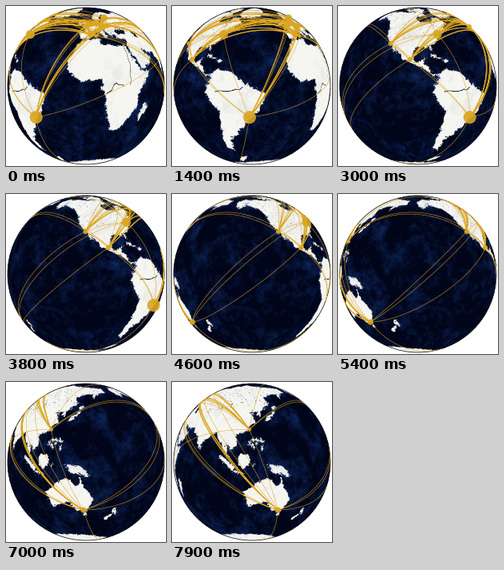
A matplotlib script for the animation above (8 s loop, 200 px wide and 200 px high).

```python
from itertools import combinations

import matplotlib.pyplot as plt
import numpy as np
from matplotlib.animation import FuncAnimation
from matplotlib.path import Path

SIZE, DPI, FRAMES, INTERVAL = 200, 100, 80, 100
CENTER, RADIUS, SUB = 100, 98, 3
START_LON, STEP = -2.7, -3.0
GOLD = "#daa520"

# World map in plate carree, RES cells per degree
RES = 4
H, W = 180 * RES, 360 * RES
rng = np.random.default_rng(4)


def smooth(field, weight):
    fy, fx = np.fft.fftfreq(H)[:, None], np.fft.rfftfreq(W)[None]
    return np.fft.irfft2(np.fft.rfft2(field) * weight(np.hypot(fx, fy)), (H, W))


def fractal(low, power=1.5):
    """Seeded cloud noise of unit deviation; low sets the largest wave."""
    n = smooth(rng.normal(size=(H, W)), lambda f: 1 / (f + low) ** power)
    return (n - n.mean()) / n.std()


true_lon, true_lat = np.meshgrid((np.arange(W) + 0.5) / RES - 180,
                                 90 - (np.arange(H) + 0.5) / RES)
# Bending the coordinates turns plain outlines into ragged coasts
lon = true_lon + 0.7 * fractal(0.02)
lat = true_lat + 0.7 * fractal(0.02)
land = np.zeros((H, W), bool)


def coast(*coords):
    """Fill an outline given as lon, lat, lon, lat, ..."""
    pts = np.reshape(coords, (-1, 2))
    (w, s), (e, n) = pts.min(0), pts.max(0)
    box = (lon >= w) & (lon <= e) & (lat >= s) & (lat <= n)
    land[box] |= Path(pts).contains_points(np.c_[lon[box], lat[box]])


def blob(x, y, length, width, tilt=0, value=True):
    """Ellipse for an island, or for a sea when value is False."""
    t = np.radians(tilt)
    dx, dy = (lon - x) * np.cos(np.radians(y)), lat - y
    u, v = dx * np.cos(t) + dy * np.sin(t), dy * np.cos(t) - dx * np.sin(t)
    land[(u / length) ** 2 + (v / width) ** 2 < 0.25] = value


def scatter_islands(n, west, east, south, north, size):
    for _ in range(n):
        blob(rng.uniform(west, east), rng.uniform(south, north),
             size * rng.uniform(0.6, 1.6), size * 0.6, rng.uniform(0, 180))


# Americas
coast(-77, 8, -72, 12, -62, 10.5, -50, 1, -35, -6, -39, -18, -48.5, -26,
      -53, -34, -58, -35, -57, -38, -65, -41, -66, -48, -69, -51, -66, -55,
      -74, -52, -73, -37, -70, -19, -76, -14, -81, -5, -80, 1)
coast(-77, 8, -83, 10, -83.5, 15, -88, 16, -87, 21.5, -91, 18.5, -95, 18.5,
      -97.5, 26, -109, 26, -105, 20, -94, 16, -88, 13, -80, 7.5)
coast(-97.5, 26, -94, 29.5, -83, 30, -81, 25, -81.5, 31, -76, 35, -70, 42,
      -61, 46, -65, 49, -56, 52, -65, 60, -78, 62, -85, 70, -125, 70, -156, 71,
      -168, 66, -165, 60, -158, 56, -147, 61, -133, 56, -124, 48, -124, 40,
      -117, 32.5, -110, 23, -113, 31, -109, 26)
# Africa
coast(-6, 36, 10, 37.3, 11, 33, 20, 31, 32, 31.2, 37.5, 19, 43, 12, 51, 12,
      48, 5, 39, -6, 40.5, -15, 35, -20, 28, -33, 19, -34.5, 12, -17, 13.5, -11,
      9, -1, 9, 4.5, -8, 4.5, -17, 13, -16.5, 21, -10, 30)
# Europe
coast(-9, 37, -9, 43, -2, 44, -4, 48, 8, 54, 9.5, 57, 10.5, 54.5, 20, 54.5,
      24, 59, 29, 60, 22, 61, 25, 65.5, 17, 62, 15, 56, 6, 58.5, 6, 62, 17, 69.5,
      28, 71, 41, 67, 50, 68, 50, 40, 27, 40, 23, 40, 23, 36.5, 19, 42, 13, 45.5,
      18, 40, 16, 38, 9, 44, 4, 43, -1, 37)
# Asia
coast(50, 68, 68, 69, 75, 73, 103, 77, 140, 72.5, 180, 69, 178, 62.5, 163, 59,
      157, 51, 157, 60, 142, 59, 135, 54.5, 140, 49, 128, 40, 129, 35, 126, 35,
      125, 39, 118, 39, 122, 37, 120, 34, 122, 30, 116, 23, 107, 21, 109, 13,
      105, 9, 100.5, 13.5, 103.5, 1.5, 98.5, 9, 98, 15, 94.5, 16, 91, 22.5,
      80, 15, 77.5, 8, 73, 18, 66, 25, 57, 26, 50, 30, 51, 25, 59, 22, 54, 17,
      44, 13, 35, 28, 36, 36.5, 27, 37, 27, 40.5, 50, 42)
# Australia and New Guinea
coast(114, -23, 115, -34.5, 124, -33, 131, -31.5, 140, -38, 146, -39, 150, -37.5,
      153.5, -28, 146, -18.5, 142.5, -11, 140, -17.5, 136, -12, 131, -11.5, 122, -18)
coast(131, -1, 145, -4, 150.5, -10.5, 138, -8, 133, -4)
# Antarctica
land |= lat < -71.5 + 5 * np.cos(np.radians(lon - 95))
blob(-62, -68, 11, 4, 60)

# Islands
blob(-41, 72, 25, 14, 70)
blob(46.7, -19, 14, 4.5, 70)
blob(-2.5, 54, 9, 3, 110)
blob(-8, 53, 3.5, 2.5)
blob(-18.5, 65, 5, 3)
blob(137, 36, 13, 2.2, 45)
blob(143, 43.4, 4, 3)
blob(175.7, -39, 7, 3, 120)
blob(170.5, -44, 8, 2.5, 45)
blob(146.7, -42, 3, 3)
blob(114, 1, 11, 8, 50)
blob(101, -0.5, 15, 3, -45)
blob(110, -7.3, 10, 1.5, -8)
blob(-79, 21.7, 10, 1.5, -20)
blob(-71, 19, 5, 2)
scatter_islands(9, 118, 128, -6, 18, 2.8)
scatter_islands(12, -120, -70, 69, 81, 5)

# Seas and lakes
blob(-84, 59, 11, 9, 0, False)
blob(34, 43.5, 9, 3.6, 0, False)
blob(51, 42, 9, 3, 110, False)
scatter_lakes = land & (fractal(0.05, 1.2) > 2.1) & (abs(true_lat - 55) < 17)


def river(*coords):
    pts = np.reshape(coords, (-1, 2))
    k = np.arange(len(pts))
    t = np.linspace(0, k[-1], 600)
    x = np.interp(t, k, pts[:, 0]) + 0.4 * np.sin(t * 9)
    y = np.interp(t, k, pts[:, 1]) + 0.4 * np.sin(t * 7)
    row, col = ((90 - y) * RES).astype(int), ((x + 180) * RES).astype(int)
    for d in (0, 1):
        world[row + d, col] = np.where(land[row + d, col, None], 0.12,
                                       world[row + d, col])


def make_map():
    relief = fractal(0.006)
    shelf = smooth(land * 1.0, lambda f: np.exp(-(f * 40) ** 2))
    ridge_lon = -25 - 17 * np.sin(np.radians(2 * true_lat))
    ridge = np.exp(-((true_lon - ridge_lon) / 6) ** 2)
    depth = 0.12 + 0.16 * relief + 0.35 * shelf + 0.15 * ridge
    sea = np.array([1, 5, 25]) + np.clip(depth, 0, 1)[..., None] * [20, 50, 100]
    ground = [246, 246, 242] - 6 * np.clip(relief, 0, 2)[..., None]
    tex = np.where((land & ~scatter_lakes)[..., None], ground, sea)
    return tex.astype(np.float32) / 255


world = make_map()
river(-73, -4, -58, -3, -51, -1)
river(26, 0, 20, 2, 13, -6)
river(32, 1, 33, 17, 31, 31)

# Screen samples back to latitude and longitude
grid = (np.arange(SIZE * SUB) + 0.5) / SUB
sx, sy = np.meshgrid((grid - CENTER) / RADIUS, (CENTER - grid) / RADIUS)
rr = sx ** 2 + sy ** 2
on_globe = rr < 1
sz = np.sqrt(np.clip(1 - rr, 0, 1))
map_row = ((90 - np.degrees(np.arcsin(sy[on_globe]))) * RES).astype(int)
rel_lon = np.degrees(np.arctan2(sx, sz))[on_globe]


def globe(lon0):
    col = ((rel_lon + lon0 + 180) % 360 * RES).astype(int) % W
    img = np.ones((SIZE * SUB, SIZE * SUB, 3), np.float32)
    img[on_globe] = world[map_row, col]
    return img.reshape(SIZE, SUB, SIZE, SUB, 3).mean((1, 3))


# Hubs as lat, lon, dot radius in pixels, then a cluster in Europe
hubs = [(-23.5, -46.6, 8), (-37.8, 145, 3.6), (32.7, -117.2, 3), (19.6, -99.1, 3.2),
        (41.2, -73.5, 5.5), (24.5, 118.1, 2.4), (60.2, 24.9, 4.5), (41.4, 2.2, 3.8)]
cluster = rng.uniform((39, -5, 2), (53, 23, 3.2), (9, 3))
cities = np.vstack([hubs, cluster])


def unit(lat, lon):
    lat, lon = np.radians(lat), np.radians(lon)
    return np.stack([np.cos(lat) * np.sin(lon), np.sin(lat),
                     np.cos(lat) * np.cos(lon)], -1)


def great_circle(a, b, n=90):
    angle = np.arccos(np.clip(a @ b, -1, 1))
    t = np.linspace(0, 1, n)[:, None]
    arc = (np.sin((1 - t) * angle) * a + np.sin(t * angle) * b) / np.sin(angle)
    return np.vstack([arc, [[np.nan] * 3]])


def project(points, lon0):
    c, s = np.cos(np.radians(lon0)), np.sin(np.radians(lon0))
    x, y, z = points.T
    xy = np.c_[CENTER + RADIUS * (x * c - z * s), CENTER - RADIUS * y]
    return xy, x * s + z * c > 0


dots = unit(cities[:, 0], cities[:, 1])
arcs = np.vstack([great_circle(a, b) for a, b in combinations(dots, 2)])

fig = plt.figure(figsize=(SIZE / DPI, SIZE / DPI), dpi=DPI, facecolor="white")
ax = fig.add_axes([0, 0, 1, 1])
ax.axis("off")
picture = ax.imshow(globe(START_LON), extent=(0, SIZE, SIZE, 0),
                    interpolation="nearest", aspect="auto")
ax.add_patch(plt.Circle((CENTER, CENTER), RADIUS, fill=False, ec="black", lw=0.5))
lines, = ax.plot([], [], color=GOLD, lw=0.36)
marks = ax.scatter(cities[:, 1], cities[:, 0], s=(cities[:, 2] * 144 / DPI) ** 2,
                   color=GOLD, alpha=0.9, linewidths=0)
ax.set(xlim=(0, SIZE), ylim=(SIZE, 0))


def update(i):
    lon0 = START_LON + STEP * i
    picture.set_data(globe(lon0))
    xy, front = project(arcs, lon0)
    xy[~front] = np.nan
    lines.set_data(xy.T)
    xy, front = project(dots, lon0)
    xy[~front] = -99
    marks.set_offsets(xy)
    return picture, lines, marks


anim = FuncAnimation(fig, update, frames=FRAMES, interval=INTERVAL,
                     repeat=True, repeat_delay=0)
plt.show()
```
